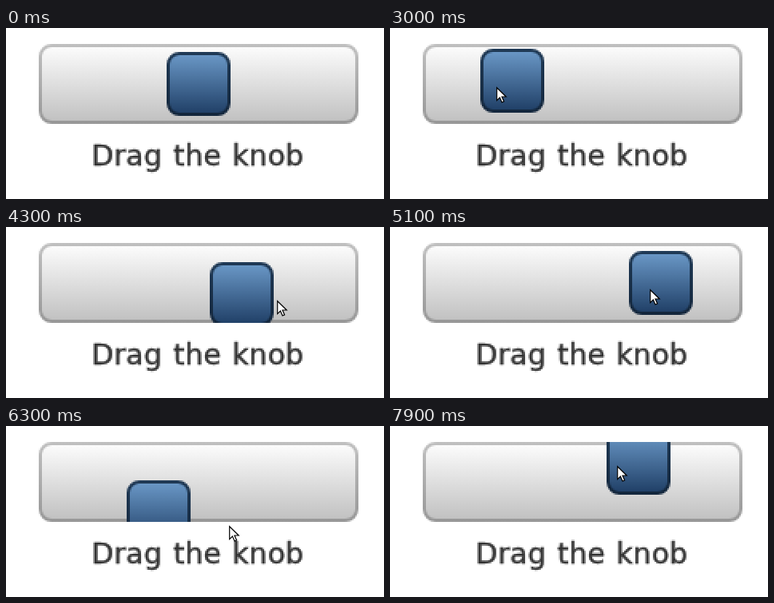
An HTML page with a canvas that plays this animation: 473 by 214 pixels, repeating every 8 s.

```html
<!DOCTYPE html>
<html lang="en">
<head>
<meta charset="utf-8">
<title>Drag the knob</title>
<style>
  html, body { margin: 0; width: 100%; height: 100%; overflow: hidden; background: #fff; }
  body { position: relative; }
  /* Low-resolution stage, doubled; its grid starts one pixel off the left edge */
  canvas { position: absolute; left: -1px; top: 0; width: 474px; height: 214px; image-rendering: pixelated; }
  svg { position: absolute; left: 0; top: 0; }
</style>
</head>
<body>
<canvas width="237" height="107" role="img" aria-label="Drag the knob"></canvas>
<svg width="473" height="214">
  <path id="cursor" d="M.7 1.7V17.6L4.4 14.1L7 20L9.6 18.9L7 13H12.2Z"
        fill="#fff" stroke="#000" stroke-width="1.2"/>
</svg>
<script>
  const LOOP = 8000, TICK = 100, SCALE = 2;
  const TRACK = { x: 21, y: 10, w: 200, h: 50 };
  const KNOB_SIZE = 40, BORDER = 2, RADIUS = 7;
  const ORIGIN = [41, 20], GRAB = [55, 48];
  const ENTER = 2, PRESS = 25;

  // Pointer strokes: first and last tick, end point, vertical bow
  const begin = [128, -19];
  const strokes = [
    [0, 6, 229, 62, 0],
    [13, 14, 230, 63, 0],
    [16, 19.5, 256, 78, 0],
    [25.7, 31.5, 109, 72, 0],
    [34, 46, 381, 80, 17],
    [48, 59, 72, 61, 0],
    [59, 66, 414, 101, 40],
    [68.3, 75.5, 330, 55, -13],
    [77.6, 82.7, 80, 22, 0]
  ];

  const ctx = document.querySelector('canvas').getContext('2d');
  const cursor = document.getElementById('cursor');

  const clamp = u => Math.min(1, Math.max(0, u));
  const ease = u => u * u * (3 - 2 * u);

  function pointer(tick) {
    let [x, y] = begin;
    for (const [from, to, endX, endY, bow] of strokes) {
      if (tick < from) break;
      const u = clamp((tick - from) / (to - from)), e = ease(u);
      x += (endX - x) * e;
      y += (endY - y) * e + bow * Math.sin(Math.PI * u);
    }
    return [x, y];
  }

  // The knob trails the pointer by one tick, in stage pixels
  function knobOffset(tick) {
    return pointer(Math.max(tick - 1, PRESS))
      .map((c, k) => Math.round((c - GRAB[k] - ORIGIN[k]) / SCALE));
  }

  function shade(y, h, top, bottom) {
    const g = ctx.createLinearGradient(0, y, 0, y + h);
    g.addColorStop(0, top);
    g.addColorStop(1, bottom);
    return g;
  }

  function panel({ x, y, w, h }, fill, edge) {
    const inset = BORDER / 2;
    ctx.beginPath();
    ctx.roundRect(x + inset, y + inset, w - BORDER, h - BORDER, RADIUS);
    ctx.fillStyle = shade(y, h, ...fill);
    ctx.strokeStyle = shade(y, h, ...edge);
    ctx.lineWidth = BORDER;
    ctx.fill();
    ctx.stroke();
  }

  function label() {
    ctx.font = '18px "DejaVu Sans", sans-serif';
    ctx.letterSpacing = '0.15px';
    ctx.wordSpacing = '1px';
    ctx.fillStyle = ctx.strokeStyle = '#333';
    ctx.lineWidth = 0.35;
    ctx.fillText('Drag the knob', 54, 86);
    ctx.strokeText('Drag the knob', 54, 86);
  }

  function drawStage([dx, dy]) {
    ctx.fillStyle = '#fff';
    ctx.fillRect(0, 0, ctx.canvas.width, ctx.canvas.height);
    panel(TRACK, ['#fefefe', '#bfbfbf'], ['#c0c0c0', '#979797']);
    label();

    ctx.save();
    ctx.beginPath();
    ctx.rect(TRACK.x, TRACK.y, TRACK.w, TRACK.h);
    ctx.clip();
    const box = { x: TRACK.x + dx, y: TRACK.y + dy, w: KNOB_SIZE, h: KNOB_SIZE };
    panel(box, ['#6d9bca', '#1d3c63'], ['#203a56', '#13263c']);
    ctx.restore();
  }

  function draw(now) {
    const tick = Math.floor(now % LOOP / TICK);
    const [x, y] = pointer(tick).map(Math.round);
    cursor.setAttribute('visibility', tick < ENTER ? 'hidden' : 'visible');
    cursor.setAttribute('transform', `translate(${x} ${y})`);
    drawStage(knobOffset(tick));
  }

  const start = performance.now();
  function loop() {
    draw(performance.now() - start);
    requestAnimationFrame(loop);
  }
  loop();
</script>
</body>
</html>
```
